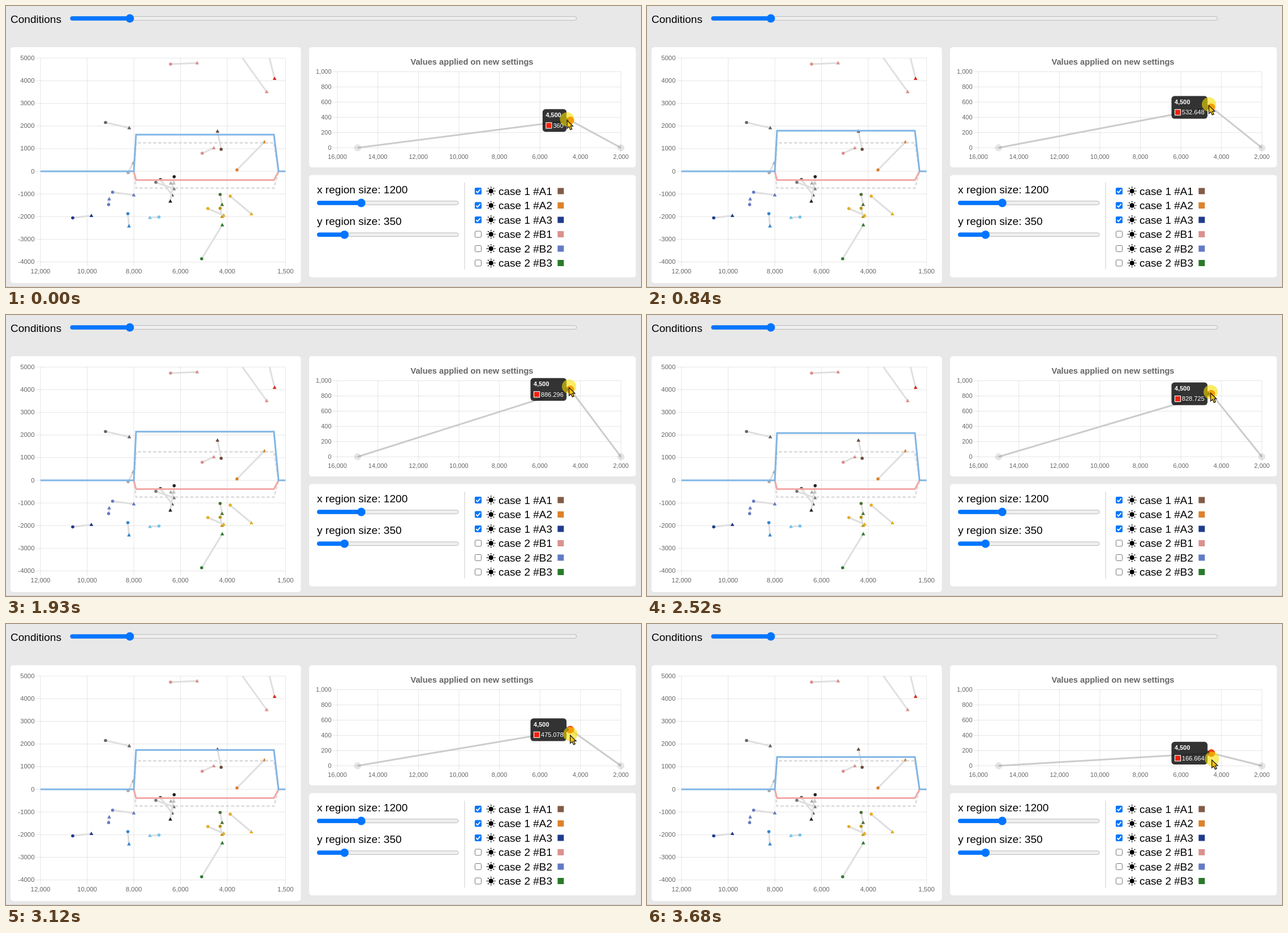
An HTML page for the animation above (3.74 s loop, 1123 by 498 pixels).

```html
<!DOCTYPE html>
<html lang="en">
<head>
<meta charset="utf-8">
<title>Conditions dashboard</title>
<style>
  html, body { margin: 0; width: 100%; height: 100%; overflow: hidden; background: #e8e8e8; }
  svg { display: block; width: 100%; height: 100%; font-family: "Liberation Sans", Arial, sans-serif; }
</style>
</head>
<body>
<svg id="stage" viewBox="0 0 1123 498"></svg>
<script>
const LOOP = 3740;
const BLUE = '#0075ff';
const GRID = 'rgba(0,0,0,.1)';
const stage = document.getElementById('stage');

// Markup helpers
const text = (x, y, s, size, extra = '') =>
  `<text x="${x}" y="${y}" font-size="${size}" ${extra}>${s}</text>`;
const box = (x, y, w, h, fill, r = 0, extra = '') =>
  `<rect x="${x}" y="${y}" width="${w}" height="${h}" rx="${r}" fill="${fill}" ${extra}/>`;
const line = (x1, y1, x2, y2, stroke, w = 1) =>
  `<path d="M${x1} ${y1}L${x2} ${y2}" stroke="${stroke}" stroke-width="${w}"/>`;
const stroke = (d, color, extra = '') =>
  `<path d="${d}" fill="none" stroke="${color}" stroke-width="3" ${extra}/>`;
const dot = (x, y, r, fill) => `<circle cx="${x}" cy="${y}" r="${r}" fill="${fill}"/>`;
const triangle = (x, y, fill) => `<path d="M${x} ${y - 3.6}l3.4 6.2h-6.8z" fill="${fill}"/>`;
const comma = n => n.toLocaleString('en-US');
const times = (n, f) => Array.from({ length: n }, (_, i) => f(i));
const range = (from, to, step) =>
  times(Math.abs(to - from) / step + 1, i => from + Math.sign(to - from) * step * i);

// Chart scales
const regionX = v => 61 + (12000 - v) * 0.04127;
const regionY = v => 293 - v * 0.04015;
const valueX = v => 586 + (16000 - v) * 0.03582;
const valueY = v => 251.3 - v * 0.1349;

function grid(xs, ys, sx, sy, formatY, size) {
  const left = sx(xs[0]), right = sx(xs.at(-1));
  const top = sy(ys[0]), bottom = sy(ys.at(-1));
  const columns = xs.map(v =>
    line(sx(v), top, sx(v), bottom + 8, GRID) +
    text(sx(v), bottom + size + 9, comma(v), size, 'fill="#666" text-anchor="middle"'));
  const rows = ys.map(v =>
    line(left - 8, sy(v), right, sy(v), GRID) +
    text(left - 10.5, sy(v) + 3.6, formatY(v), size, 'fill="#666" text-anchor="end"'));
  return columns.join('') + rows.join('');
}

function slider(x, y, w, thumb) {
  return box(x + .5, y - 3.3, w - 1, 6.6, '#efefef', 3.3, 'stroke="#b8b8b8"') +
    box(x, y - 3.7, thumb - x, 7.4, BLUE, 3.7) + dot(thumb, y, 7.4, BLUE);
}

function sun(x, y) {
  const rays = times(8, i =>
    `<path d="M0 -5.8V-7.8" transform="rotate(${i * 45})" stroke="#000" stroke-width="1.5"/>`);
  return `<g transform="translate(${x} ${y})">${dot(0, 0, 4.3, '#000')}${rays.join('')}</g>`;
}

function checkbox(x, y, on) {
  return on
    ? box(x, y, 12, 12, BLUE, 2) +
      `<path d="M${x + 2.4} ${y + 6.2}l2.5 2.6l4.9 -5.8" fill="none" stroke="#fff" stroke-width="1.9"/>`
    : box(x + .5, y + .5, 11, 11, '#fff', 2, 'stroke="#767676"');
}

// A trail runs from a dot to a triangle
const trail = (color, x, y, dx, dy) =>
  line(x, y, x + dx, y + dy, '#dfdfdf', 3) + dot(x, y, 2.8, color) + triangle(x + dx, y + dy, color);

function trails() {
  const fan = times(3, i =>
    trail(['#777', '#4c4c4c', '#222'][i], 265 + 8.1 * i * i, 312.5 - 5 * i,
      32 - 3.2 * i - 8.1 * i * i, 11.5 + 16 * i));
  const cut = times(2, i =>
    line(418 + 48 * i, 92, 461 + 14 * i, 152 - 23.5 * i, '#dfdfdf', 3) +
    triangle(461 + 14 * i, 152 - 23.5 * i, ['#db8f8c', '#d42a18'][i]));
  const drops = times(2, i =>
    trail(['#4a6f30', '#b5940f'][i], 378.7, 334 + 24.5 * i, 3.5, 18 - 3.5 * i));
  const golds = times(2, i => trail('#e4ae24', 357 + 39.5 * i, 359 - 22 * i, 28 + 9.5 * i, 12 + 19.5 * i));
  const pinks = times(2, i => trail('#db8f8c', 291 + 56 * i, 103 + 158 * i, 47 - 26.5 * i, -2 - 7.5 * i));
  const greys = times(2, i => trail(['#666', '#aaa'][i], 176 + 40 * i, 206.5 + 89 * i, 42 - 33 * i, 9.5 - 27 * i));
  const singles =
    trail('#6579c4', 188.5, 330, 37.5, 5) + trail('#6579c4', 181.5, 352, 1, -10) +
    trail('#1f3c8c', 118, 375.5, 33, -4) + trail('#3286d0', 215.5, 368, 2, 22) +
    trail('#6fc3ea', 270.5, 374, -16, 1) + trail('#2f7a2f', 346, 448, 36.5, -60) +
    trail('#6b4a3d', 380.5, 254, -6.5, -32) + trail('#d9822b', 408.5, 290.5, 48.5, -49.5);
  return [fan, cut, drops, golds, pinks, greys].flat().join('') + singles +
    triangle(291.5, 314, '#aaa') + triangle(297, 314, '#c4c4c4');
}

const plateau = v => `226 293L230 ${regionY(v)}H473.8L482 293`;

function regionChart() {
  return grid([...range(12000, 4000, 2000), 1500], range(5000, -4000, 1000), regionX, regionY, String, 11.4) +
    trails() +
    [1260, -740].map(v => stroke('M' + plateau(v), '#dedede', 'stroke-dasharray="5.5 3.5"')).join('') +
    stroke('M' + plateau(-385), '#f2a9a5') +
    stroke('', '#80b5e6', 'id="region"');
}

function valueChart() {
  return text(824, 104, 'Values applied on new settings', 14.7,
      'fill="#666" font-weight="bold" text-anchor="middle"') +
    grid(range(16000, 2000, 2000), range(1000, 0, 200), valueX, valueY, comma, 11) +
    stroke('', '#ccc', 'id="trend"') +
    [15000, 2000].map(v => dot(valueX(v), valueY(0), 6.2, GRID)).join('') +
    '<circle id="handle" r="6.7" fill="#f03c10"/>';
}

function settings() {
  const colors = ['#825b48', '#dd812c', '#1f3c8c', '#db918e', '#637bc4', '#2a7a2a'];
  const rows = colors.map((color, i) => {
    const y = 328 + i * 25.5;
    const name = i < 3 ? `case 1 #A${i + 1}` : `case 2 #B${i - 2}`;
    return checkbox(829, y - 6, i < 3) + sun(857.7, y) +
      text(871, y + 6.6, name, 19) + box(975.5, y - 5.5, 11, 11, color);
  });
  return text(550, 332, 'x region size: 1200', 19.1) + slider(550, 349, 250.5, 628.3) +
    text(550, 388.3, 'y region size: 350', 19.1) + slider(550, 405.3, 250.5, 598.6) +
    line(811, 313, 811, 467, '#ccc') + rows.join('');
}

const tooltip = `<g id="tip">
  <path d="M0 -5L4.5 0L0 5z" fill="#000" fill-opacity=".8"/>
  <rect id="tipBox" y="-20" height="40.3" rx="5.5" fill="#000" fill-opacity=".8"/>
  <g id="tipBody" fill="#fff">
    ${text(5.5, -5.4, '4,500', 11, 'font-weight="bold"')}
    ${box(5.5, 3.4, 11.2, 11.2, '#fff')}${box(6.6, 4.5, 9, 9, '#f4200c')}
    <text id="tipValue" x="18.5" y="12.8" font-size="11"></text>
  </g></g>`;

const pointer = `<g id="pointer">
  <circle cy="-2" r="12.6" fill="#f7e000" fill-opacity=".6"/>
  <path d="M0 0V14.2L3.4 11.2L5.8 16.6L8.6 15.4L6.2 10.2H10.4Z"
    fill="#fcc21a" stroke="#111" stroke-width="1.2"/></g>`;

stage.innerHTML =
  box(0, 0, 1123, 498, '#e8e8e8') + line(0, 497.5, 1123, 497.5, '#d2d2d2') +
  text(8, 30, 'Conditions', 19.05) + slider(113.5, 22, 896, 219) +
  box(8, 73, 513.5, 418, '#fff', 5) +
  box(536, 73, 577.8, 213, '#fff', 5) +
  box(536, 299.5, 577.8, 181.5, '#fff', 5) +
  regionChart() + valueChart() + settings() + tooltip + pointer;

const [region, trend, handle, tip, tipBox, tipBody, tipValue, cursor] =
  ['region', 'trend', 'handle', 'tip', 'tipBox', 'tipBody', 'tipValue', 'pointer']
    .map(id => document.getElementById(id));

// time, value, pointer offset below the handle
const keys = [
  [0, 360, 0], [130, 360, 0], [840, 532.648, -3], [1340, 725.92, -4], [1930, 886.296, -3],
  [2250, 886.296, -3], [2520, 828.725, -1], [2790, 755, 3], [3120, 475.078, 10], [3680, 166.664, 12]
];

// Each leg between keys advances in equal steps of about 68 ms
function pose(time) {
  const i = keys.findLastIndex(k => k[0] <= time);
  const a = keys[i], b = keys[i + 1] || a;
  const span = b[0] - a[0];
  const steps = Math.max(1, Math.round(span / 68));
  const k = span ? Math.floor((time - a[0]) / span * steps + 1e-6) / steps : 0;
  return a.map((v, j) => v + (b[j] - v) * k);
}

function draw(time) {
  const [now, value, offset] = pose(time);
  const x = valueX(4500), y = valueY(value), base = valueY(0);

  region.setAttribute('d', `M61 293L${plateau(1260 + value)}H494.3`);
  trend.setAttribute('d', `M${valueX(15000)} ${base}L${x} ${y}L${valueX(2000)} ${base}`);
  handle.setAttribute('cx', x);
  handle.setAttribute('cy', y);

  tipValue.textContent = +value.toFixed(3);
  const width = tipValue.getComputedTextLength() + 24;
  tip.setAttribute('transform', `translate(991.3 ${y})`);
  tipBox.setAttribute('x', -width);
  tipBox.setAttribute('width', width);
  tipBody.setAttribute('transform', `translate(${-width} 0)`);
  cursor.setAttribute('transform', `translate(${992.3 + now * .0018} ${y + offset})`);
}

const start = performance.now();
function frame() {
  draw((performance.now() - start) % LOOP);
  requestAnimationFrame(frame);
}
frame();
</script>
</body>
</html>
```
